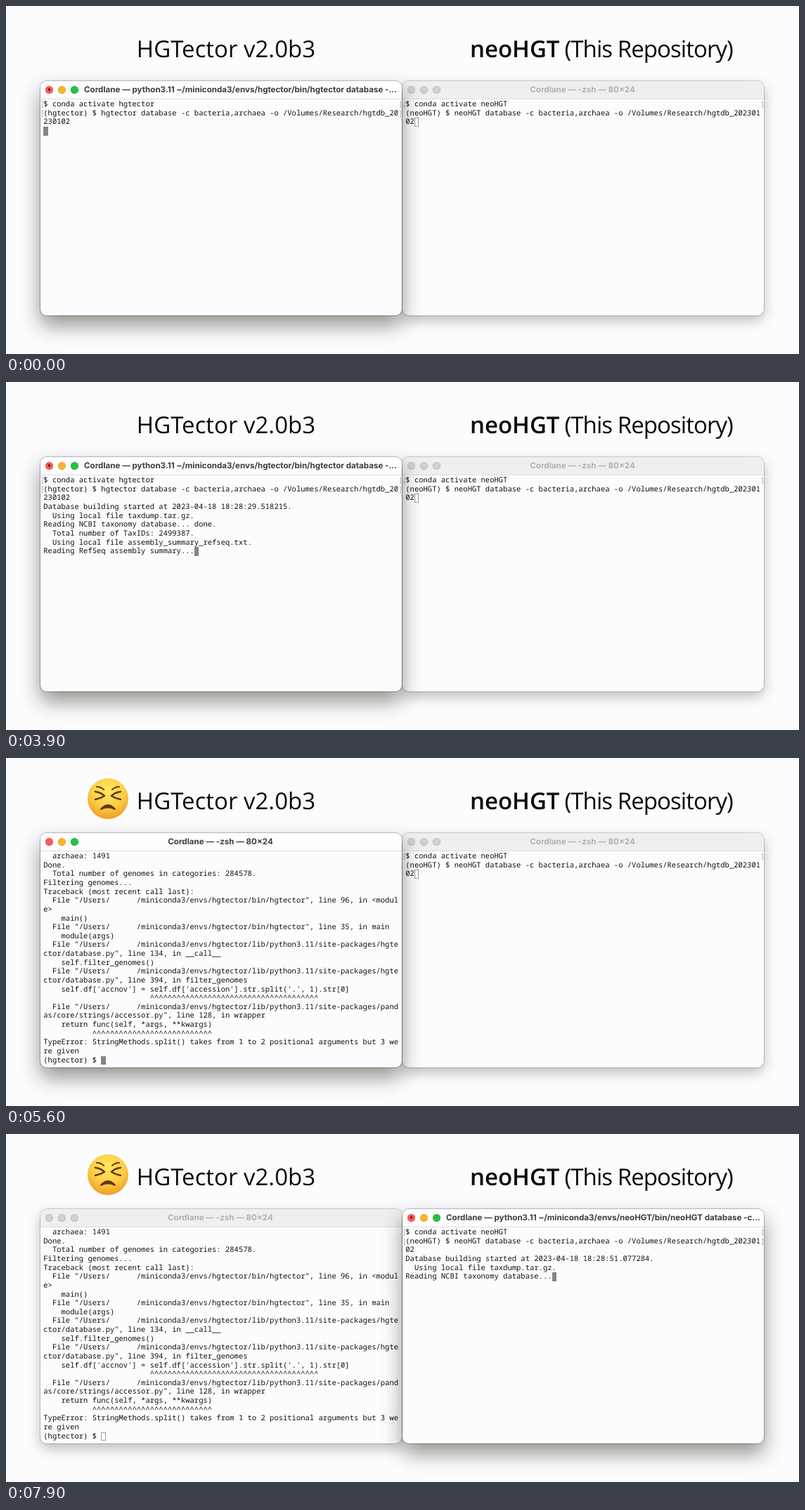
Animation of 1128 by 496 pixels, one loop 8000 ms. Source, as an HTML page:

```html
<!DOCTYPE html>
<html lang="en">
<head>
<meta charset="utf-8">
<title>HGTector and neoHGT</title>
<style>
  html, body { margin: 0; width: 100%; height: 100%; overflow: hidden; background: #fcfcff; }
  body { position: relative; text-rendering: geometricPrecision; }
  svg { position: absolute; left: 0; top: 0; }
  .heading { font: 33px "Open Sans", "Noto Sans", sans-serif; fill: #0a0a0a; }
  .win {
    position: absolute; top: 107px; width: 514px; height: 334px; border-radius: 9px;
    background: #fcfcff; color: #111;
    box-shadow: 0 0 0 1px rgba(0,0,0,.17), 0 7px 18px rgba(20,20,0,.28);
  }
  .win.active { z-index: 1; box-shadow: 0 0 0 1px rgba(0,0,0,.24), 0 14px 29px rgba(20,20,0,.46); }
  .bar {
    position: absolute; left: 0; right: 0; top: 0; height: 25px; border-radius: 9px 9px 0 0;
    background: #efeef0; border-bottom: 1px solid #e0dfdf;
    font: 700 11.6px/24px Inter, sans-serif; color: #b0aeb0; white-space: pre;
  }
  .active .bar { background: #fefdff; color: #3d3d3d; }
  .name { position: absolute; left: 0; width: 512px; text-align: center; }
  .running .name { left: 62px; width: auto; }
  .light {
    position: absolute; top: 6.5px; width: 11px; height: 11px; border-radius: 50%;
    background: #d2d0d2; box-shadow: inset 0 0 0 1px #c1bfc1;
  }
  .active .light { background: var(--c); box-shadow: inset 0 0 0 .5px rgba(0,0,0,.15); }
  .active.running .light:first-child::after {
    content: ""; position: absolute; left: 3.7px; top: 3.7px; width: 3.6px; height: 3.6px;
    border-radius: 50%; background: #760d0a;
  }
  .screen {
    position: absolute; left: 4.3px; top: 27.2px;
    font: 500 10.52px/12.63px "Noto Sans Mono", "DejaVu Sans Mono", monospace;
  }
  pre { margin: 0; font: inherit; }
  .cursor {
    position: absolute; width: 1ch; height: 12.6px; box-sizing: border-box;
    border: 1px solid #a0a0a0;
  }
  .active .cursor { background: #858585; border-color: #858585; }
  .mark {
    position: absolute; width: 2px; height: 9px; box-sizing: border-box;
    border: 1px solid #b4b4b4;
  }
  .open { left: 1.5px; border-right: 0; }
  .close { left: 511px; border-left: 0; }
</style>
</head>
<body>
<svg width="1128" height="496">
  <defs>
    <radialGradient id="skin" cx=".5" cy=".3" r=".72">
      <stop offset="0" stop-color="#ffe75f"/>
      <stop offset=".55" stop-color="#fdcf45"/>
      <stop offset="1" stop-color="#ed9a22"/>
    </radialGradient>
  </defs>
  <g id="face" fill="none" stroke="#623a10" stroke-width="2.6" stroke-linecap="round" stroke-linejoin="round">
    <circle cx="145" cy="58" r="29" fill="url(#skin)" stroke="none"/>
    <path d="M127 48 Q135 49 140 54 Q134 58 127 59 M163 48 Q155 49 150 54 Q156 58 163 59"/>
    <path d="M129 41 Q135 41 139 45 M161 41 Q155 41 151 45" stroke-width="2"/>
    <path d="M135 73 Q145 61 155 73 Q145 68 135 73" fill="#623a10" stroke-width="2"/>
  </g>
  <text class="heading" x="185.8" y="73">HGTector v2.0b3</text>
  <text class="heading" x="660" y="73" font-weight="600" style="font-weight:600">neoHGT</text>
  <text class="heading" x="794.5" y="73" style="letter-spacing:-.95px">(This Repository)</text>
</svg>

<script>
const LOOP = 8000, ROWS = 24, ROW_HEIGHT = 12.63;
const IDLE = "Cordlane — -zsh — 80×24";
const home = '  File "/Users/' + " ".repeat(6) + "/miniconda3/envs/hgtector/";
const carets = (indent, n) => " ".repeat(indent) + "^".repeat(n);

// Each entry is [time, text appended to the screen].
const leftLog = [
  [0, `$ conda activate hgtector
(hgtector) $ hgtector database -c bacteria,archaea -o /Volumes/Research/hgtdb_20
230102
`],
  [200, `Database building started at 2023-04-18 18:28:29.518215.
  Using local file taxdump.tar.gz.
Reading NCBI taxonomy database...`],
  [3300, ` done.
  Total number of TaxIDs: 2499387.
  Using local file assembly_summary_refseq.txt.
Reading RefSeq assembly summary...`],
  [4200, ` done.
  Total number of genomes: 298546.
Genome categories: bacteria, archaea
Downloading genome list per RefSeq category...
  Using local file refseq_bacteria.txt.
`],
  [4400, `  bacteria: 283087
  Using local file refseq_archaea.txt.
  archaea: 1491
Done.
`],
  [5000, `  Total number of genomes in categories: 284578.
Filtering genomes...
Traceback (most recent call last):
${home}bin/hgtector", line 96, in <modul
e>
    main()
${home}bin/hgtector", line 35, in main
    module(args)
${home}lib/python3.11/site-packages/hgte
ctor/database.py", line 134, in __call__
    self.filter_genomes()
${home}lib/python3.11/site-packages/hgte
ctor/database.py", line 394, in filter_genomes
    self.df['accnov'] = self.df['accession'].str.split('.', 1).str[0]
${carets(24, 38)}
${home}lib/python3.11/site-packages/pand
as/core/strings/accessor.py", line 128, in wrapper
    return func(self, *args, **kwargs)
${carets(11, 27)}
TypeError: StringMethods.split() takes from 1 to 2 positional arguments but 3 we
re given
(hgtector) $ `],
];
const rightLog = [
  [0, `$ conda activate neoHGT
(neoHGT) $ neoHGT database -c bacteria,archaea -o /Volumes/Research/hgtdb_202301
02`],
  [6200, "\n"],
  [6700, `Database building started at 2023-04-18 18:28:51.077284.
  Using local file taxdump.tar.gz.
Reading NCBI taxonomy database...`],
];

function addWindow(x, log, busyTitle) {
  const win = document.createElement("div");
  const lights = ["#fd5a50", "#f7b52c", "#28c140"].map((c, i) =>
    `<div class="light" style="--c:${c};left:${7 + 18 * i}px"></div>`).join("");
  const marks = [0, 1].map(row => ["open", "close"].map(side =>
    `<div class="mark ${side}" style="top:${29.2 + row * ROW_HEIGHT}px"></div>`).join("")).join("");
  win.style.left = x + "px";
  win.innerHTML = `<div class="bar">${lights}<span class="name"></span></div>${marks}
    <div class="screen"><div class="cursor"></div><pre></pre></div>`;
  document.body.append(win);
  const name = win.querySelector(".name"), pre = win.querySelector("pre");
  const cursor = win.querySelector(".cursor"), markList = win.querySelectorAll(".mark");

  return (t, active, running) => {
    const all = log.filter(([at]) => t >= at).map(([, text]) => text).join("").split("\n");
    const lines = all.slice(-ROWS);
    win.className = "win" + (active ? " active" : "") + (running ? " running" : "");
    name.textContent = running ? busyTitle : IDLE;
    pre.textContent = lines.join("\n");
    cursor.style.left = lines.at(-1).length + "ch";
    cursor.style.top = (lines.length - 1) * ROW_HEIGHT + "px";
    markList.forEach((mark, i) => {
      mark.hidden = all.length > ROWS || (i > 1 && !running);
    });
  };
}

const drawLeft = addWindow(49, leftLog,
  "Cordlane — python3.11 ~/miniconda3/envs/hgtector/bin/hgtector database -...");
const drawRight = addWindow(564, rightLog,
  "Cordlane — python3.11 ~/miniconda3/envs/neoHGT/bin/neoHGT database -c...");
const face = document.getElementById("face");

function frame() {
  const t = performance.now() % LOOP;
  drawLeft(t, t < 5900, t < 5100);
  drawRight(t, t >= 5900, t >= 6200);
  face.style.display = t >= 5000 ? "" : "none";
  requestAnimationFrame(frame);
}
frame();
</script>
</body>
</html>
```
